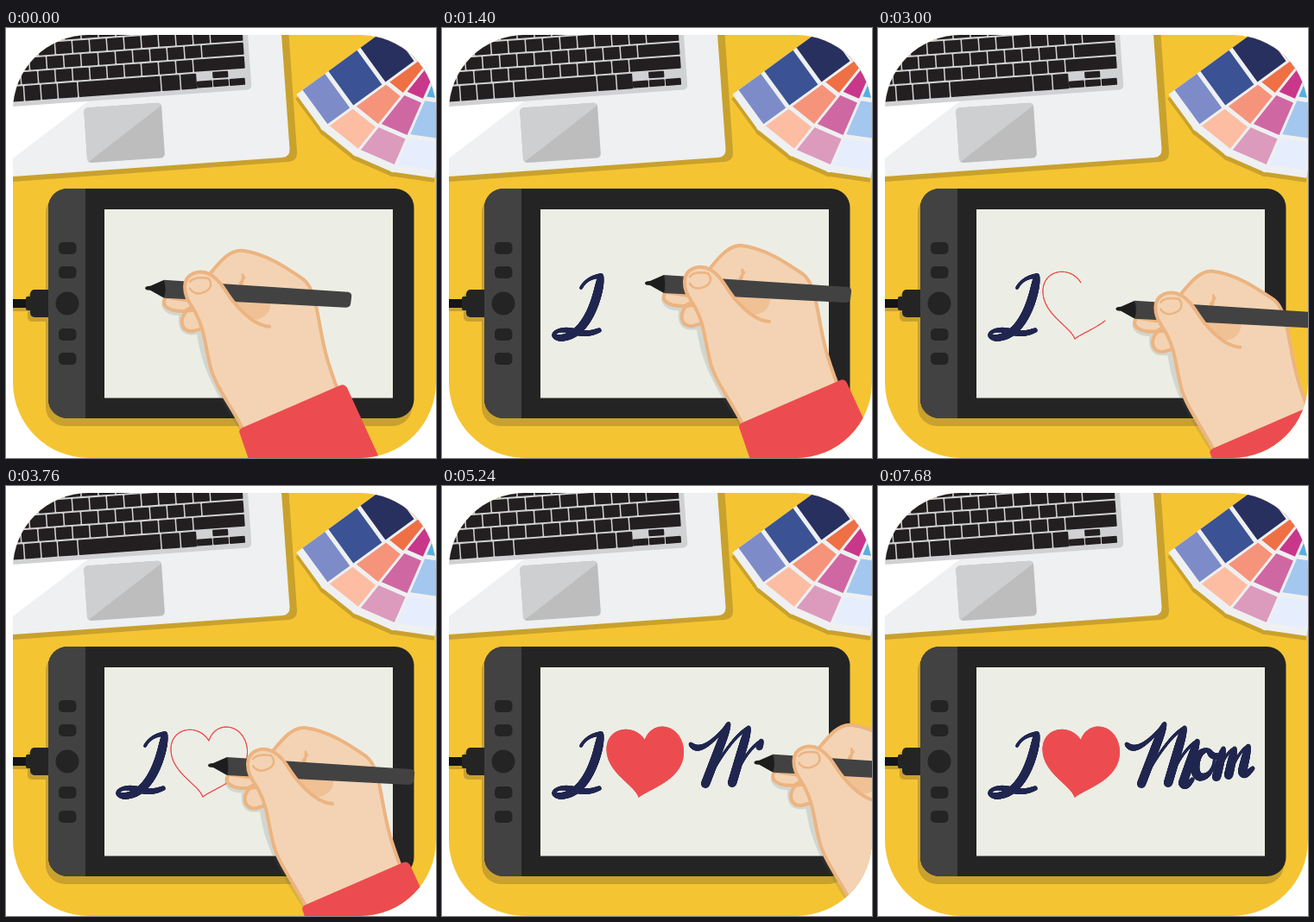
Animation of 498 by 498 pixels, one loop 8.04 s. Source, as an HTML page with a canvas:

```html
<!DOCTYPE html>
<html lang="en">
<head>
<meta charset="utf-8">
<title>Drawing tablet</title>
<style>
  html, body { margin: 0; width: 100%; height: 100%; overflow: hidden; background: #fff; }
  canvas { display: block; }
</style>
</head>
<body>
<canvas id="stage" width="498" height="498"></canvas>
<script>
const ctx = document.getElementById('stage').getContext('2d');
const LOOP = 8040, HAND_GONE = 7400, HEART_FILL = 3960;
const INK_GAP = 18; // the line trails the pen by this many pixels
const NAVY = '#20264f', RED = '#ec4c4f', DARK = '#242424', GREY = '#424242', PAPER = '#eef0f1';
const SKIN = '#f3d3b3', SKIN_LINE = '#ecb481', SHADE = '#c9a12d';

const fill = (color, d) => { ctx.fillStyle = color; ctx.fill(new Path2D(d)); };
const line = (color, width, d) => {
  ctx.strokeStyle = color;
  ctx.lineWidth = width;
  ctx.stroke(new Path2D(d));
};
const box = (color, x, y, w, h, r = 0) => {
  ctx.fillStyle = color;
  ctx.beginPath();
  ctx.roundRect(x, y, w, h, r);
  ctx.fill();
};
const shape = (color, d) => { fill(color, d); line(SKIN_LINE, 4, d); };
const placed = (x, y, angle, paint) => {
  ctx.save();
  ctx.translate(x, y);
  ctx.rotate(angle);
  paint();
  ctx.restore();
};
const clamp = v => Math.max(0, Math.min(1, v));
const smooth = u => u * u * (3 - 2 * u);

// One pen movement; those with a colour leave ink.
function leg(from, to, d, color) {
  const path = document.createElementNS('http://www.w3.org/2000/svg', 'path');
  path.setAttribute('d', d);
  const length = path.getTotalLength();
  const at = u => path.getPointAtLength(u * length);
  const pts = Array.from({ length: Math.ceil(length) + 1 }, (_, i) => path.getPointAtLength(i));
  return { from, to, d, color, length, at, pts };
}

const heartLeft = 'M235 295C222 274 190 280 191 306C192 332 222 345 228 360';
const heartRight = 'C240 350 281 340 279.5 306C277 275 243 270 235 295';
const legs = [
  leg(0, 840, 'M161 301C166 292 174 288 184 287C181 312 168 357 137 359C124 358 130 348 146 350C158 352 166 357 182 350', NAVY),
  leg(1400, 2640, heartLeft, RED),
  leg(2650, 3510, 'M228 360' + heartRight, RED),
  leg(3760, HEART_FILL, 'M234 323h.1'),
  leg(4150, 5360, 'M288 299Q300 314 332 275L305 345Q335 290 355 280L336 344Q352 305 370 295L353 344Q356 350 364 340', NAVY),
  leg(5480, 5760, 'M383 306C366 304 362 338 375 337C390 336 394 308 383 306Q386 314 394 313', NAVY),
  leg(5820, 6240, 'M400 304L392 337Q402 308 413 304L406 335Q418 306 429 301L422 330Q423 338 434 327', NAVY),
  leg(6360, 6400, 'M429 330h.1'),
  leg(HAND_GONE, LOOP, 'M512 330h.1')
];

function penTip(t) {
  const i = legs.findLastIndex(l => l.from <= t), now = legs[i], next = legs[i + 1];
  if (t <= now.to || !next) return now.at(clamp((t - now.from) / (now.to - now.from)));
  const u = (t - now.to) / (next.from - now.to);
  const k = next.from === HAND_GONE ? u ** 5 : smooth(u);
  const a = now.at(1), b = next.at(0);
  return { x: a.x + (b.x - a.x) * k, y: a.y + (b.y - a.y) * k };
}

function ink({ from, to, color, length, pts }, t) {
  const done = (t - from) / (to - from) * length - INK_GAP;
  ctx.strokeStyle = color;
  let width = 4;
  for (let i = 1; i < pts.length && i <= done; i++) {
    const a = pts[i - 1], b = pts[i];
    // Thick going down, thin going up.
    width += (6.5 + 4 * (b.y - a.y) - width) * .14;
    ctx.lineWidth = color === RED ? 1.1 : width;
    ctx.beginPath();
    ctx.moveTo(a.x, a.y);
    ctx.lineTo(b.x, b.y);
    ctx.stroke();
  }
}

function heart(t) {
  const u = clamp((t - HEART_FILL) / 480) - 1;
  const scale = 1 + 2.7 * u ** 3 + 1.7 * u ** 2;
  placed(235, 320, 0, () => {
    ctx.scale(scale, scale);
    ctx.translate(-235, -320);
    fill(RED, heartLeft + heartRight);
  });
}

function keyboard() {
  const key = (x, y, w, h) => box('#231f20', x, y, w, h, 1);
  box('#d0d1d2', -20, -110, 297, 114, 5);
  let x = -6;
  for (const w of [19, 18, 18, 22, 95, 21, 18]) {
    key(x, -19, w, 17.5);
    x += w + 1.5;
  }
  for (let i = 0; i < 3; i++) key(214 + i * 19, -10, 18, 8);
  key(233, -19.5, 18, 7.5);
  for (let row = 0; row < 5; row++) {
    const y = -35 - row * 16, last = 212 + row * 11;
    for (let x = last - 260; x < last - 1; x += 20) key(x, y, 18.5, 14);
    key(last, y, 271 - last, 14);
  }
}

function laptop() {
  fill(SHADE, 'M0 0H327L337 143Q338 154 327 155L0 178.5Z');
  fill(PAPER, 'M0 0H318.5L328.5 140Q329 149 320 150L0 172.5Z');
  fill('#fff', 'M0 80H100L92 87L0 157Z');
  placed(8, 87, -.0716, keyboard);
  placed(90, 92.5, -.068, () => {
    box('#bdbdbd', 0, 0, 90, 64, 5);
    fill('#cecfd0', 'M5 0H85Q89 0 90 3L1 63L0 59V5Q0 0 5 0Z');
  });
}

// Four cards fanned around one pivot, the first on top.
function swatches() {
  const cards = [
    ['#7d8cc8', '#3b5294', '#28305f', '#1f274f'],
    ['#fdbda3', '#f6937b', '#ef7045', '#e2433f'],
    ['#dc9bbd', '#cf67a3', '#c9378a', '#b32a7c'],
    ['#e6edfc', '#a3c7ef', '#58aee2', '#2f86c8']
  ];
  const angle = i => -.63 - i * .265;
  cards.forEach((_, i) => placed(496, -3, angle(i), () => box(SHADE, -180, -26, 180, 52)));
  for (let i = 3; i >= 0; i--) {
    placed(497, -8, angle(i), () => {
      box(PAPER, -180, -26, 180, 52);
      cards[i].forEach((color, n) => box(color, n ? -180 + n * 46 : -171, -26, n ? 41 : 32, 49));
    });
  }
}

function tablet() {
  box(SHADE, 0, 319, 26, 9);
  box(SHADE, 25, 307, 30, 33, 5);
  box(SHADE, 46, 192, 424, 269, 22);
  box('#151515', 0, 314, 28, 10);
  box(DARK, 23, 311, 10, 16, 2);
  box(DARK, 28, 303, 30, 32, 5);
  box(DARK, 49, 186, 423.5, 266, 22);
  box(GREY, 49, 186, 43, 266, [22, 0, 0, 22]);
  for (const y of [248, 276, 348, 376]) box(DARK, 61, y, 20.5, 14, 5);
  box(DARK, 57.5, 305.5, 27, 27, 13.5);
  box('#eceee5', 114, 210, 334, 218.5);
}

const thumb = 'M276 468C262 440 243 416 237 394C230 366 230 350 220 331C213 318 207 313 207 300'
  + 'C207 284 224 279 237 286C250 294 254 306 263 317C276 333 290 345 305 346';

// Drawn with the pen tip at 161, 301.
function hand() {
  ctx.translate(-161, -301);
  fill('rgba(70,90,95,.16)', 'M180 320C182 332 195 334 200 333C198 350 205 358 221 355C226 385 232 408 272 468L300 440L240 320Z');
  shape(SKIN, 'M186 312C178 318 184 329 207 328L225 318Z');
  shape(SKIN, 'M209 328C199 340 204 353 217 351L228 348L224 326Z');
  shape(SKIN, 'M230 292C244 276 256 257 273 258C300 261 325 278 344 291C359 303 360 332 368 368C373 392 379 404 386 425L276 470L235 345Z');
  line(SKIN_LINE, 3, 'M274 286C275 293 273 299 268 304M276 289L271 296');
  fill('#efc195', 'M262 312L306 318C307 330 298 338 286 338C276 334 268 325 262 312Z');
  fill(GREY, 'M183 292L396 306Q401 307 400 312L399 320Q398 324 393 324L183 313Z');
  fill('#1d1d1d', 'M183 292L167 299Q161 299 161 301.5Q161 304 167 304L183 313Q186 303 183 292Z');
  fill(SKIN, thumb + 'L320 420Z');
  line(SKIN_LINE, 4, thumb);
  line(SKIN_LINE, 2.5, 'M213 294C217 289 227 289 234 290C240 297 237 304 227 307C220 309 215 306 213 302');
  fill(RED, 'M274 463L387 414Q392 412 395 417L452 541L302 561L270 468Q270 465 274 463Z');
}

function draw() {
  const t = performance.now() % LOOP;
  ctx.fillStyle = '#fff';
  ctx.fillRect(0, 0, 498, 498);
  ctx.save();
  ctx.beginPath();
  ctx.roundRect(8, 8, 490, 490, 88);
  ctx.clip();
  ctx.lineCap = ctx.lineJoin = 'round';
  box('#f5c432', 0, 0, 498, 498);
  laptop();
  swatches();
  tablet();
  for (const l of legs) if (l.color) ink(l, t);
  if (t > HEART_FILL) heart(t);
  if (t < HAND_GONE) {
    const { x, y } = penTip(t);
    placed(x, y, 0, hand);
  }
  ctx.restore();
  requestAnimationFrame(draw);
}
draw();
</script>
</body>
</html>
```
